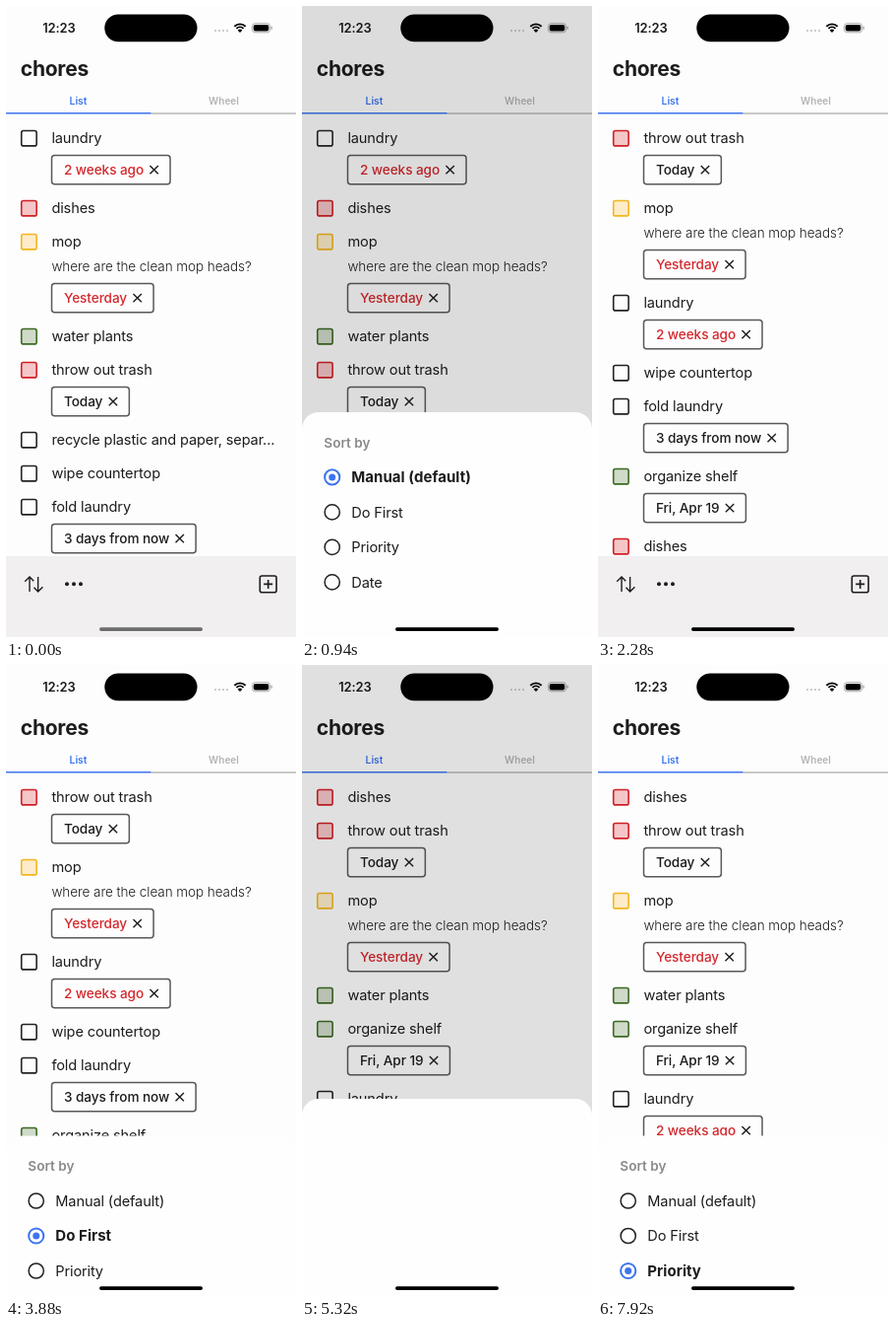
Recreate the animation shown at these times as an HTML page with a canvas. Size 295 by 640 pixels, loop 8000 ms.

```html
<!DOCTYPE html>
<html lang="en">
<head>
<meta charset="utf-8">
<title>Chores</title>
<style>
html, body { margin: 0; width: 100%; height: 100%; overflow: hidden; background: #fdfdfd; }
canvas { display: block; width: 295px; height: 640px; }
</style>
</head>
<body>
<canvas id="stage"></canvas>
<script>
const W = 295, H = 640, LOOP = 8000, STEP = 107;
const SHEET_TOP = 410, DIM = 0.132;
const INK = '#1c1c1e', BLUE = '#3d74ee', PAPER = '#fdfdfd';

const canvas = document.getElementById('stage');
const ctx = canvas.getContext('2d');
const ratio = window.devicePixelRatio || 1;
canvas.width = W * ratio;
canvas.height = H * ratio;

const LEVELS = {
  high: ['#d01f24', '#f5c6c8'],
  mid: ['#f2b51e', '#fcecc9'],
  low: ['#3b6a22', '#d0dac9'],
  none: ['#222', PAPER]
};

const TASKS = {
  laundry: { title: 'laundry', level: 'none', due: '2 weeks ago', late: true },
  dishes: { title: 'dishes', level: 'high' },
  mop: { title: 'mop', level: 'mid', note: 'where are the clean mop heads?', due: 'Yesterday', late: true },
  plants: { title: 'water plants', level: 'low' },
  trash: { title: 'throw out trash', level: 'high', due: 'Today' },
  recycle: { title: 'recycle plastic and paper, separ...', level: 'none' },
  wipe: { title: 'wipe countertop', level: 'none' },
  fold: { title: 'fold laundry', level: 'none', due: '3 days from now' },
  shelf: { title: 'organize shelf', level: 'low', due: 'Fri, Apr 19' }
};

const SORTS = ['Manual (default)', 'Do First', 'Priority', 'Date'];
const ORDERS = [
  'laundry dishes mop plants trash recycle wipe fold',
  'trash mop laundry wipe fold shelf dishes',
  'dishes trash mop plants shelf laundry recycle wipe'
].map(s => s.split(' '));

// Each visit opens the sheet, picks a sort and closes it again.
const VISITS = [
  { open: 500, settle: 1210, close: 1740, end: 2280 },
  { open: 3880, settle: 4580, close: 5210, end: 5750 },
  { open: 7920, settle: 9000, close: 9000, end: 9000 }
];

function text(str, x, y, size, weight, color, spacing = 0, align = 'left') {
  ctx.font = `${weight} ${size}px Inter, "Liberation Sans", sans-serif`;
  ctx.letterSpacing = spacing + 'px';
  ctx.textAlign = align;
  ctx.textBaseline = 'alphabetic';
  ctx.fillStyle = color;
  ctx.fillText(str, x, y + size * 0.355);
  return ctx.measureText(str).width;
}

function box(x, y, w, h, r, fill, stroke, line = 1.5) {
  ctx.beginPath();
  ctx.roundRect(x, y, w, h, r);
  paint(fill, stroke, line);
}

function disc(x, y, r, fill, stroke, line) {
  ctx.beginPath();
  ctx.arc(x, y, r, 0, Math.PI * 2);
  paint(fill, stroke, line);
}

function paint(fill, stroke, line) {
  if (fill) { ctx.fillStyle = fill; ctx.fill(); }
  if (stroke) { ctx.strokeStyle = stroke; ctx.lineWidth = line; ctx.stroke(); }
}

function path(color, line, ...runs) {
  ctx.beginPath();
  for (const [x, y, ...rest] of runs) {
    ctx.moveTo(x, y);
    for (let i = 0; i < rest.length; i += 2) ctx.lineTo(rest[i], rest[i + 1]);
  }
  paint(null, color, line);
}

function drawStatus() {
  text('12:23', 37.2, 22.3, 12.9, 600, INK, -0.1);
  box(100.3, 8.4, 94.2, 27.8, 13.9, '#000');
  for (let i = 0; i < 4; i++) disc(213 + i * 4, 25, 1.1, '#c2c2c2');

  for (const r of [8, 5]) {
    ctx.beginPath();
    ctx.arc(238, 26.4, r, -Math.PI * 0.75, -Math.PI * 0.25);
    paint(null, '#000', 1.8);
  }
  ctx.beginPath();
  ctx.moveTo(238, 27);
  ctx.arc(238, 27, 3.2, -Math.PI * 0.75, -Math.PI * 0.25);
  paint('#000');

  box(250.4, 17.6, 18.2, 9.2, 3, null, '#999', 0.8);
  box(251.7, 18.9, 15.6, 6.6, 1.9, '#000');
  box(269.6, 20.6, 1.1, 3.2, 0.5, '#999');
}

function drawHeader() {
  text('chores', 14.8, 64, 21, 700, INK, -0.25);
  text('List', 73.5, 96.5, 10.3, 600, BLUE, 0, 'center');
  text('Wheel', 221.5, 96.5, 10, 600, '#b4b4b6', 0, 'center');
  path('#b9b9bb', 1.4, [147.5, 109, W, 109]);
  path(BLUE, 1.5, [0, 108.8, 147.5, 108.8]);
}

function drawChip(task, y) {
  const width = text(task.due, 59, y, 13.6, 500, task.late ? '#d3282d' : INK, -0.08);
  const end = 59 + width;
  box(46.5, y - 14.7, end + 27 - 46.5, 29.4, 3, null, '#58585a', 1.5);
  const x = end + 10.6, a = 4.2;
  path(INK, 1.4, [x - a, y - a, x + a, y + a], [x - a, y + a, x + a, y - a]);
}

function drawList(order) {
  let y = 134.2;
  for (const key of order) {
    const task = TASKS[key];
    const [edge, fill] = LEVELS[task.level];
    box(15.7, y - 7.7, 15.4, 15.4, 2, fill, edge, 1.6);
    text(task.title, 46.4, y, 14.6, 400, INK, -0.13);
    if (task.note) {
      y += 25;
      text(task.note, 46.4, y + 0.5, 13.5, 300, INK, -0.06);
    }
    if (task.due) {
      drawChip(task, y + 31.9);
      y += 37;
    }
    y += 34;
  }
}

function drawToolbar() {
  ctx.fillStyle = '#f1eff0';
  ctx.fillRect(0, 558, W, 82);
  path(INK, 1.4,
    [24, 594, 24, 579], [19.2, 583.8, 24, 579, 28.2, 583.2],
    [32.6, 579, 32.6, 594], [28.4, 589.8, 32.6, 594, 37.4, 589.2]);
  for (let i = 0; i < 3; i++) disc(62 + i * 7, 586.3, 2, INK);
  box(258.3, 578, 16.8, 16.8, 2, null, INK, 1.6);
  path(INK, 1.6, [262.2, 586.4, 271.2, 586.4], [266.7, 581.9, 266.7, 590.9]);
}

function drawSheet(top, picked, blank) {
  box(0, top, W, H - top + 20, [17, 17, 0, 0], '#fefefe');
  if (blank) return;
  text('Sort by', 22.3, top + 31, 13.5, 600, '#8a8a8d', 0.05);
  SORTS.forEach((label, i) => {
    const y = top + 66 + i * 35.5, on = i === picked;
    disc(30.7, y, 7.6, null, on ? BLUE : '#222', on ? 2 : 1.5);
    if (on) disc(30.7, y, 3.5, BLUE);
    if (on) text(label, 50.3, y, 15, 700, INK, 0.05);
    else text(label, 50.3, y, 14.6, 400, INK, -0.13);
  });
}

function sheetState(t, visit) {
  const { open, settle, close, end } = visit;
  if (t < open || t >= end) return null;
  if (t < close) {
    const k = Math.floor((t - open) / STEP);
    if (k === 0) return { top: 477.5, dim: 0 };
    const p = t >= settle ? 1 : 1 - Math.exp(-1.2 * Math.min(k, 4));
    return { top: H - (H - SHEET_TOP) * p, dim: p };
  }
  const k = Math.floor((t - close) / STEP);
  const p = k === 0 ? 1 : 0.87 * Math.exp(-1.2 * (k - 1));
  return { top: H - (H - SHEET_TOP) * p, dim: p, blank: k > 0 };
}

function draw(t) {
  ctx.setTransform(ratio, 0, 0, ratio, 0, 0);
  ctx.fillStyle = PAPER;
  ctx.fillRect(0, 0, W, H);

  const picked = VISITS.filter(v => t >= v.close).length;
  drawStatus();
  drawHeader();
  drawList(ORDERS[picked]);
  drawToolbar();

  const sheet = VISITS.map(v => sheetState(t, v)).find(Boolean);
  if (sheet) {
    ctx.fillStyle = `rgba(0,0,0,${DIM * sheet.dim})`;
    ctx.fillRect(0, 0, W, H);
    drawSheet(sheet.top, picked, sheet.blank);
  }
  box(95, 630.2, 105, 3.7, 1.85, t < VISITS[0].open ? '#6e6d6e' : '#000');
}

const start = performance.now();
function tick() {
  draw((performance.now() - start) % LOOP);
  requestAnimationFrame(tick);
}
tick();
</script>
</body>
</html>
```
